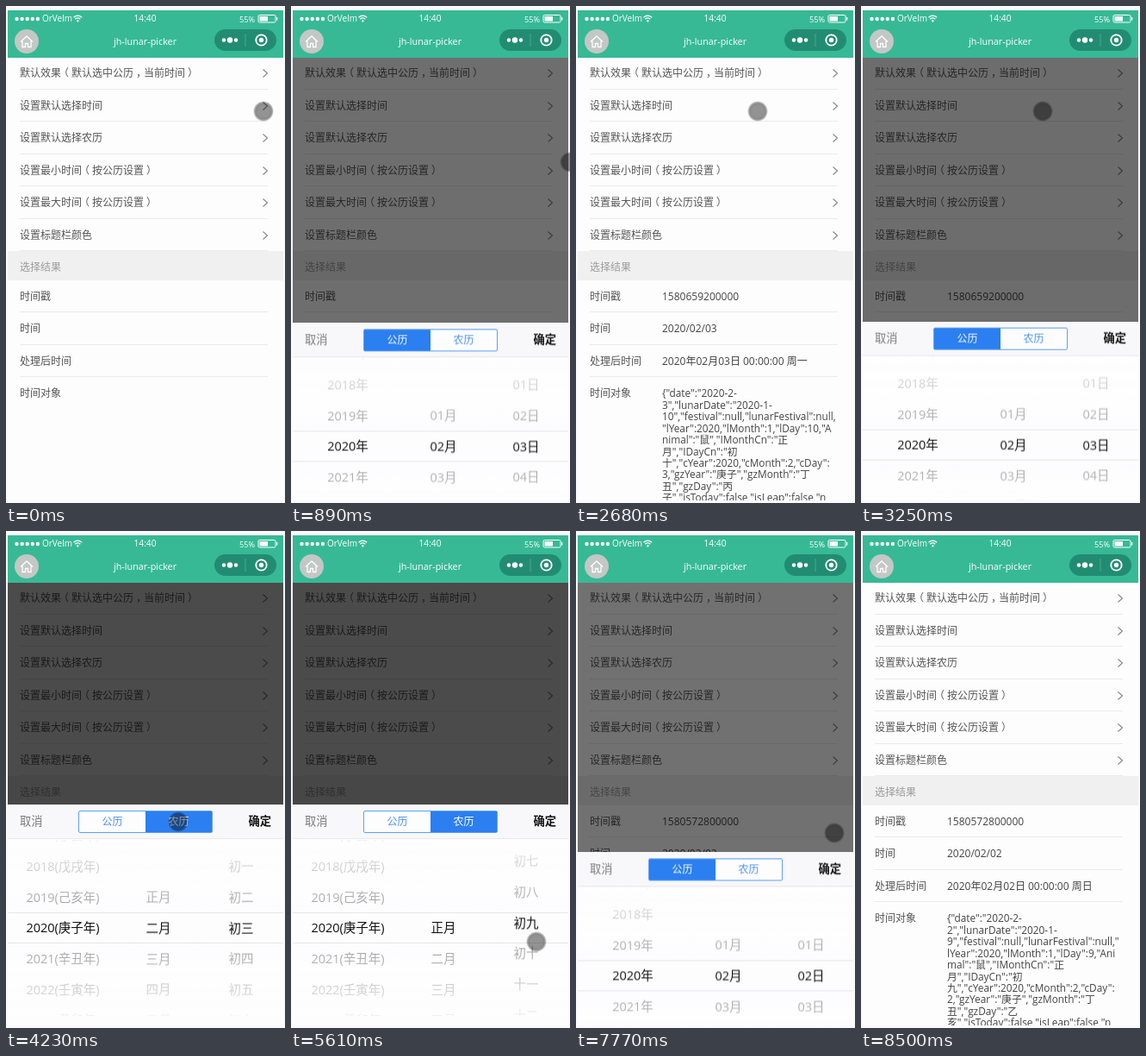
An HTML page that plays this animation: 324x576 px, repeating every 8.54 s.

```html
<!DOCTYPE html>
<html lang="zh-CN">
<head>
<meta charset="utf-8">
<title>jh-lunar-picker</title>
<style>
:root { --loop: 8540ms; --pitch: 35.7px; --paper: #fdfdfe; --bar: #f8f8fa; --blue: #2b7ff0; }
* { box-sizing: border-box; }
html, body { margin: 0; width: 100%; height: 100%; overflow: hidden; background: var(--paper); }
body { font: 12px "Open Sans", "Noto Sans CJK SC", "Noto Sans CJK", sans-serif; color: #555; white-space: nowrap; }
.stage { position: relative; width: 324px; height: 576px; overflow: hidden; background: #fafafd; }
.screen { position: absolute; left: 2px; top: 0; width: 320px; height: 573px; overflow: hidden; background: var(--paper); }
.header { position: absolute; left: 0; top: 0; }
.header text { fill: #fff; }

.row { position: absolute; left: 0; width: 100%; height: 37.5px; line-height: 37.5px; padding-left: 14px; }
.row::after { content: ""; position: absolute; left: 14px; width: 288px; bottom: 0; border-bottom: 1px solid #ebebef; }
.row svg { position: absolute; left: 295px; top: 13px; }
.row i { position: relative; left: 3px; font-style: normal; }
.row i.open { left: -3px; }
.row.pressed { background: #ececee; animation: press var(--loop) step-end infinite; }
.section { position: absolute; top: 284.25px; width: 100%; height: 33.5px; line-height: 38px; padding-left: 14px; background: #f0f0f1; color: #9c9c9c; }
.result { position: absolute; left: 98px; top: 317.75px; line-height: 37.5px; color: #444; }
.result pre { font: inherit; font-size: 11.8px; line-height: 13.45px; margin: 12px 0 0; }
.first { animation: first var(--loop) step-end infinite; }
.second { animation: second var(--loop) step-end infinite; }

.shade { position: absolute; inset: 60px 0 0; background: rgb(0 0 0 / .7); animation: shade var(--loop) ease infinite; }
.sheet { position: absolute; left: 0; top: 317px; width: 320px; height: 259px; background: var(--paper); animation: sheet var(--loop) ease infinite; }
.bar { height: 40px; line-height: 38px; padding: 0 14px; display: flex; justify-content: space-between; font-size: 13.3px; background: var(--bar); border-bottom: 1px solid #e9e9ee; color: #7a7a7a; }
.bar b { font-weight: 600; color: #141414; }
.tabs { position: absolute; left: 82px; top: 7px; width: 156px; height: 26px; display: flex; border: 1px solid #5f9ff4; border-radius: 2px; background: var(--paper); }
.tabs span { flex: 1; text-align: center; line-height: 23px; color: #4a90f2; }
.tabs .on { background: var(--blue); color: #fff; }
.wheels { position: absolute; top: 41px; width: 100%; height: 204px; overflow: hidden; font-size: 14.5px; color: #111; }
.wheels::after { content: ""; position: absolute; inset: 0; background:
  linear-gradient(rgb(253 253 254 / .95), rgb(253 253 254 / .6)) 0 0 / 100% 84px no-repeat,
  linear-gradient(rgb(253 253 254 / .6), rgb(253 253 254 / .95)) 0 100% / 100% 84px no-repeat; }
.band { position: absolute; top: 84px; width: 100%; height: 36px; border: solid #e6e6ec; border-width: 1px 0; }
.wheel { position: absolute; top: 84.15px; width: 110px; text-align: center; line-height: var(--pitch); }
.wheel:nth-child(1) { left: 9px; }
.wheel:nth-child(2) { left: 120px; }
.wheel:nth-child(3) { left: 216px; }
.wheel div { height: var(--pitch); }
.year { translate: 0 calc(-3 * var(--pitch)); }
.solar { animation: solar var(--loop) step-end infinite; }
.lunar { animation: lunar var(--loop) step-end infinite; }
.solar .month { animation: solar-month var(--loop) ease infinite; }
.solar .day { animation: solar-day var(--loop) ease infinite; }
.lunar .month { animation: lunar-month var(--loop) ease infinite; }
.lunar .day { animation: lunar-day var(--loop) ease-in-out infinite; }

.cursor { position: absolute; left: -12px; top: -12px; width: 24px; height: 24px; border-radius: 50%;
  background: radial-gradient(circle, rgb(0 0 0 / .42) 7px, rgb(0 0 0 / .46) 9px, rgb(0 0 0 / .3) 10.5px, transparent 12px);
  animation: cursor var(--loop) ease-in-out infinite; }

@keyframes press { 0% { opacity: 0 } 6.674% { opacity: 1 } 9.016% { opacity: 0 } 34.309% { opacity: 1 } 36.6%, to { opacity: 0 } }
@keyframes first { 0% { opacity: 0 } 24.532% { opacity: 1 } 90.421%, to { opacity: 0 } }
@keyframes second { 0% { opacity: 0 } 90.421%, to { opacity: 1 } }
@keyframes solar { 0% { opacity: 1 } 49.532% { opacity: 0 } 75.293%, to { opacity: 1 } }
@keyframes lunar { 0% { opacity: 0 } 49.532% { opacity: 1 } 75.293%, to { opacity: 0 } }
@keyframes shade {
  0%, 8.665% { opacity: 0 } 12.178%, 24.532% { opacity: 1 }
  28.044%, 36.276% { opacity: 0 } 39.789%, 90.421% { opacity: 1 }
  93.934%, to { opacity: 0 }
}
@keyframes sheet {
  0%, 8.665% { translate: 0 259px } 12.178%, 24.532% { translate: 0 0 }
  28.044%, 36.276% { translate: 0 259px } 39.789%, 90.421% { translate: 0 0 }
  93.934%, to { translate: 0 259px }
}
@keyframes solar-month {
  0%, 75.292% { translate: 0 calc(-1 * var(--pitch)) }
  75.293% { translate: 0 0 }
  77.166%, to { translate: 0 calc(-1 * var(--pitch)) }
}
@keyframes solar-day {
  0%, 75.292% { translate: 0 calc(-2 * var(--pitch)) }
  75.293% { translate: 0 calc(-8 * var(--pitch)) }
  77.166%, to { translate: 0 calc(-1 * var(--pitch)) }
}
@keyframes lunar-month {
  0%, 49.532% { translate: 0 calc(-1 * var(--pitch)) }
  51.405%, to { translate: 0 0 }
}
@keyframes lunar-day {
  0%, 49.532% { translate: 0 calc(-2 * var(--pitch)) }
  51.405%, 57.963% { translate: 0 calc(-9 * var(--pitch)) }
  62.881%, 65.691% { translate: 0 calc(-8.168 * var(--pitch)) }
  67.096%, to { translate: 0 calc(-8 * var(--pitch)) }
}
@keyframes cursor {
  0%, 9.016% { translate: 299px 122px }
  11.71% { translate: 345px 230px }
  16.628% { translate: 338px 374px }
  17.096% { translate: 326px 360px }
  19.087%, 25.176% { translate: 308px 342px }
  30.913%, 39.801% { translate: 211px 122px }
  46.721%, 53.396% { translate: 200px 337px }
  57% { translate: 297px 425px }
  57.963% { translate: 290px 446px }
  62.881%, 66.2% { translate: 285px 476px }
  71.897%, 76.8% { translate: 96px 337px; animation-timing-function: ease-in }
  80.5% { translate: 205px 197px; animation-timing-function: linear }
  83.5% { translate: 308px 300px; animation-timing-function: ease-out }
  85.246% { translate: 297px 353px }
  86.183%, 91.5% { translate: 300px 350px }
  95%, to { translate: 345px 310px }
}
</style>
</head>
<body>
<div class="stage">
  <div class="screen">
    <div id="rows"></div>
    <div class="section">选择结果</div>
    <div class="result first">1580659200000<br>2020/02/03<br>2020年02月03日 00:00:00 周一<pre>{"date":"2020-2-
3","lunarDate":"2020-1-
10","festival":null,"lunarFestival":null,
"lYear":2020,"lMonth":1,"lDay":10,"A
nimal":"鼠","IMonthCn":"正
月","IDayCn":"初
十","cYear":2020,"cMonth":2,"cDay":
3,"gzYear":"庚子","gzMonth":"丁
丑","gzDay":"丙
子","isToday":false,"isLeap":false,"n</pre></div>
    <div class="result second">1580572800000<br>2020/02/02<br>2020年02月02日 00:00:00 周日<pre>{"date":"2020-2-
2","lunarDate":"2020-1-
9","festival":null,"lunarFestival":null,"
lYear":2020,"lMonth":1,"lDay":9,"Ani
mal":"鼠","IMonthCn":"正
月","IDayCn":"初
九","cYear":2020,"cMonth":2,"cDay":
2,"gzYear":"庚子","gzMonth":"丁
丑","gzDay":"乙
亥","isToday":false,"isLeap":false,"n</pre></div>
    <div class="shade"></div>
    <div class="sheet">
      <div class="bar"><span>取消</span><b>确定</b></div>
      <div class="solar">
        <div class="tabs"><span class="on">公历</span><span>农历</span></div>
        <div class="wheels" id="solar"></div>
      </div>
      <div class="lunar">
        <div class="tabs"><span>公历</span><span class="on">农历</span></div>
        <div class="wheels" id="lunar"></div>
      </div>
    </div>
  </div>

  <svg class="header" width="324" height="60">
    <rect width="324" height="6" fill="#fafafd"/>
    <rect x="2" y="5" width="320" height="55" fill="#37b996"/>
    <path d="M12.500 15h26" stroke="#fff" stroke-width="4.400" stroke-linecap="round" stroke-dasharray="0 6.100"/>
    <text x="42" y="18" font-size="10">OrVelm</text>
    <g fill="none" stroke="#fff" stroke-width="1.300">
      <path d="M78.500 13.200q4.800-4.200 9.600 0M80.300 15.200q3-2.600 6 0"/>
      <circle cx="83.300" cy="17.200" r=".6"/>
      <rect x="293" y="10.500" width="20" height="8.500" rx="1.500" stroke-width="1"/>
    </g>
    <path d="M294.500 12h9.500v5.500h-9.500zM314 13h1.300v3.500h-1.300z" fill="#fff"/>
    <text x="161.500" y="17.700" font-size="10.200" text-anchor="middle">14:40</text>
    <text x="271" y="18.500" font-size="9.200">55%</text>
    <circle cx="24" cy="41" r="14" fill="#c3c7c5"/>
    <path d="M17 41.500l7-6.500 7 6.500M19 40.500v7h3.500v-4h3v4h3.500v-7" fill="none" stroke="#fff" stroke-width="1.300"/>
    <text x="161.500" y="45" font-size="10.800" text-anchor="middle">jh-lunar-picker</text>
    <rect x="242" y="27" width="72" height="25" rx="12.500" fill="#228c72"/>
    <path d="M278 32v15" stroke="#4aa68f"/>
    <g fill="#fff"><circle cx="253" cy="39.500" r="2.200"/><circle cx="260" cy="39.500" r="3.200"/><circle cx="267" cy="39.500" r="2.200"/><circle cx="296.500" cy="39.500" r="2.700"/></g>
    <circle cx="296.500" cy="39.500" r="6.200" fill="none" stroke="#fff" stroke-width="1.800"/>
  </svg>
  <div class="cursor"></div>
</div>

<script>
const byId = id => document.getElementById(id);
const range = (from, to, format) => Array.from({ length: to - from + 1 }, (_, i) => format(from + i));
const pad = n => String(n).padStart(2, '0');
const arrow = '<svg width="8" height="12"><path d="M1.500 1.500l5 4.500-5 4.500" fill="none" stroke="#858585" stroke-width="1.100"/></svg>';

// Full-width punctuation sits in the middle of its cell.
const centred = label => label.replace(/[（，）]/g, mark => `<i${mark === '（' ? ' class="open"' : ''}>${mark}</i>`);
const row = (label, top, extra = '') => `<div class="row" style="top:${top}px">${centred(label)}${extra}</div>`;
const options = ['默认效果（默认选中公历，当前时间）', '设置默认选择时间', '设置默认选择农历',
  '设置最小时间（按公历设置）', '设置最大时间（按公历设置）', '设置标题栏颜色'];
const fields = ['时间戳', '时间', '处理后时间', '时间对象'];
byId('rows').innerHTML =
  '<div class="row pressed" style="top:96.75px"></div>' +
  options.map((label, i) => row(label, 59.25 + 37.5 * i, arrow)).join('') +
  fields.map((label, i) => row(label, 317.75 + 37.5 * i)).join('');
byId('rows').lastElementChild.style.clipPath = 'inset(0 0 2px)';

const wheel = (name, items) =>
  `<div class="wheel ${name}">${items.map(item => `<div>${item}</div>`).join('')}</div>`;
const fill = (id, years, months, days) => {
  byId(id).innerHTML = wheel('year', years) + wheel('month', months) + wheel('day', days) + '<div class="band"></div>';
};

const digits = [...'一二三四五六七八九十'];
const cycle = ['丁酉', '戊戌', '己亥', '庚子', '辛丑', '壬寅', '癸卯'];
fill('solar', range(2017, 2023, y => y + '年'), range(1, 12, m => pad(m) + '月'), range(1, 29, d => pad(d) + '日'));
fill('lunar', cycle.map((name, i) => `${2017 + i}(${name}年)`),
  ['正', ...digits.slice(1), '冬', '腊'].map(m => m + '月'),
  [...digits.map(d => '初' + d), ...digits.slice(0, 9).map(d => '十' + d)]);
</script>
</body>
</html>
```
